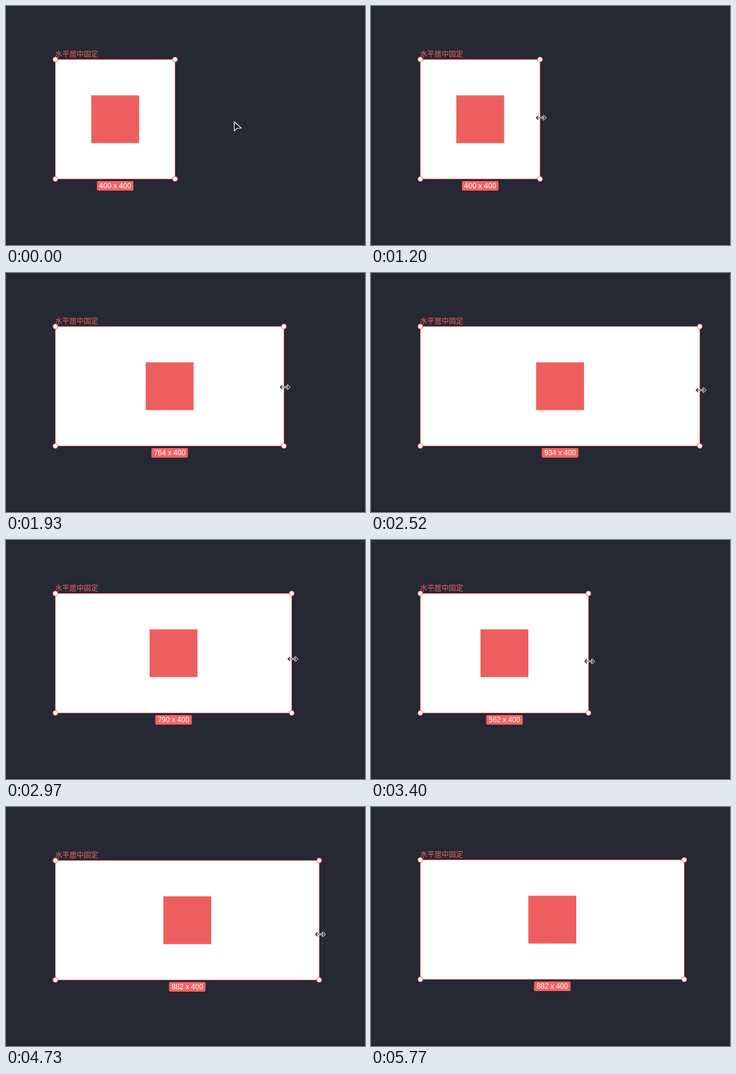
An HTML page with a canvas that plays this animation: 600 px wide and 400 px high, repeating every 6.02 s.

```html
<!DOCTYPE html>
<html lang="zh">
<head>
<meta charset="utf-8">
<title>水平居中固定</title>
<style>
html, body { margin: 0; width: 600px; height: 400px; overflow: hidden; background: #262833; }
canvas { display: block; }
</style>
</head>
<body>
<canvas id="stage" width="600" height="400"></canvas>
<script>
const ctx = document.getElementById('stage').getContext('2d');
const LOOP = 6020;
const LEFT = 82.5, TOP = 89.5, HEIGHT = 200;
const RED = '#f46464';

// Each phase advances in equal steps, one list entry per step.
const approach = { start: 300, end: 1200, path: [0.05, 0.18, 0.38, 0.6, 0.8, 0.94, 1] };
const drags = [
  { start: 1490, end: 2520, y: [187, 196], widths: [212, 262, 326, 382, 424, 450, 463, 467] },
  { start: 2670, end: 3700, y: [197, 205], widths: [459, 434, 395, 350, 310, 281, 265, 259] },
  { start: 3850, end: 4730, y: [207, 213], widths: [272, 310, 358, 399, 424, 437, 441] }
];
const leave = { start: 5180, end: 5770, path: [0.08, 0.3, 0.62, 0.9, 1.2] };

function stepOf(phase, list, t) {
  const span = (phase.end - phase.start) / (list.length - 1);
  return Math.min(list.length - 1, Math.floor((t - phase.start + 6) / span));
}

const mix = (a, b, k) => a + (b - a) * k;

function poseAt(t) {
  const pose = { width: 200, x: 381.5, y: 193.5, cursor: 'arrow', dy: 0, moved: false };
  if (t >= approach.start) {
    const k = approach.path[stepOf(approach, approach.path, t)];
    pose.x = mix(381.5, 284, k);
    pose.y = mix(193.5, 187, k);
    if (k === 1) pose.cursor = 'resize';
  }
  for (const d of drags) {
    if (t < d.start) break;
    const i = stepOf(d, d.widths, t);
    pose.width = d.widths[i];
    pose.x = LEFT + pose.width + 1.5;
    pose.y = mix(d.y[0], d.y[1], i / (d.widths.length - 1));
    pose.moved = true;
  }
  if (t >= leave.start) {
    const k = leave.path[stepOf(leave, leave.path, t)];
    pose.x = mix(525, 583, k);
    pose.y = mix(213, 396, k);
    pose.cursor = k > 1 ? 'none' : 'arrow';
    if (k > 1) pose.dy = -1;
  }
  return pose;
}

function polyline(points, close) {
  ctx.beginPath();
  points.forEach(([x, y]) => ctx.lineTo(x, y));
  if (close) ctx.closePath();
}

function drawArrow(x, y) {
  ctx.save();
  ctx.translate(x, y);
  polyline([[0, 0], [11.6, 10.8], [5, 11], [0, 15.3]], true);
  ctx.fillStyle = '#16171d';
  ctx.fill();
  ctx.lineWidth = 1.2;
  ctx.lineJoin = 'round';
  ctx.strokeStyle = '#fff';
  ctx.stroke();
  ctx.restore();
}

function drawResize(x, y) {
  ctx.save();
  ctx.translate(Math.round(x), Math.round(y));
  ctx.lineCap = ctx.lineJoin = 'round';
  for (const [color, width] of [['#fff', 3], ['#15161b', 1.2]]) {
    ctx.strokeStyle = color;
    ctx.lineWidth = width;
    polyline([[-7, 0], [7, 0]]);
    ctx.stroke();
    for (const s of [-1, 1]) {
      polyline([[s * 4.5, -3], [s * 7.6, 0], [s * 4.5, 3]]);
      ctx.stroke();
    }
  }
  ctx.restore();
}

function drawHandle(x, y) {
  ctx.beginPath();
  ctx.arc(x, y, 4, 0, Math.PI * 2);
  ctx.fillStyle = '#fff';
  ctx.fill();
  ctx.lineWidth = 1.1;
  ctx.strokeStyle = RED;
  ctx.stroke();
}

function drawFrame(pose) {
  const w = pose.width, mid = LEFT + w / 2;
  ctx.fillStyle = RED;
  ctx.textAlign = 'left';
  ctx.font = '12px "Noto Sans CJK SC", "Noto Sans CJK", sans-serif';
  ctx.fillText('水平居中固定', 82, 85);

  ctx.fillStyle = '#fff';
  ctx.fillRect(LEFT, TOP, w, HEIGHT);
  ctx.lineWidth = 1;
  ctx.strokeStyle = RED;
  ctx.strokeRect(LEFT, TOP, w, HEIGHT);
  ctx.fillStyle = '#ed5f5f';
  ctx.fillRect(mid - 40, 149.5, 80, 80);

  for (const x of [LEFT, LEFT + w])
    for (const y of [TOP, TOP + HEIGHT]) drawHandle(x, y);

  ctx.fillStyle = RED;
  ctx.beginPath();
  ctx.roundRect(mid - 30.5, 293, 61, 16, 2);
  ctx.fill();
  ctx.fillStyle = '#fff';
  ctx.textAlign = 'center';
  ctx.font = pose.moved
    ? '12px "Liberation Sans", Arial, sans-serif'
    : '500 12px "Noto Sans", "Open Sans", sans-serif';
  ctx.fillText(w * 2 + ' x 400', mid, 305);
}

function draw(t) {
  const pose = poseAt(t);
  ctx.fillStyle = '#262833';
  ctx.fillRect(0, 0, 600, 400);
  ctx.save();
  ctx.translate(0, pose.dy);
  ctx.fillStyle = '#20222b';
  ctx.fillRect(0, 398, 600, 3);
  drawFrame(pose);
  ctx.restore();
  if (pose.cursor === 'arrow') drawArrow(pose.x, pose.y);
  if (pose.cursor === 'resize') drawResize(pose.x, pose.y);
}

const begin = performance.now();
function tick() {
  draw((performance.now() - begin) % LOOP);
  requestAnimationFrame(tick);
}
tick();
</script>
</body>
</html>
```
